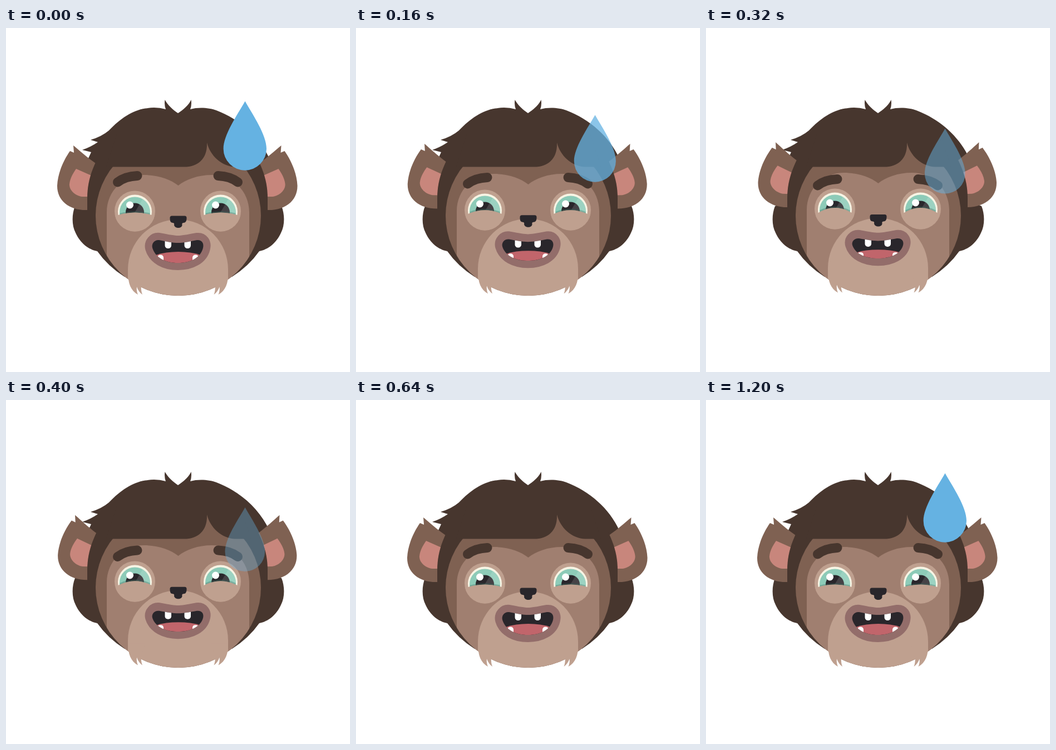
Animation of 618x618 px, one loop 1280 ms. Source, as an HTML page:

```html
<!DOCTYPE html>
<html lang="en">
<head>
<meta charset="utf-8">
<title>Nervous monkey</title>
<style>
  html, body { margin: 0; height: 100%; overflow: hidden; background: #fff; }
  svg { display: block; width: 100%; height: 100%; }
  .hair { fill: #47362e; }
  .skin { fill: #7f6152; }
  .pale { fill: #bfa08f; }
  .ink { fill: #29262b; }
</style>
</head>
<body>
<svg viewBox="0 0 618 618">
  <defs>
    <clipPath id="headClip"><ellipse cx="309.5" cy="337" rx="148.5" ry="144"/></clipPath>
    <clipPath id="socketClip"><circle cx="231.5" cy="329" r="36.5"/></clipPath>
    <clipPath id="irisClip"><circle cx="231.5" cy="331" r="27.5"/></clipPath>
    <path id="mouthShape" d="M275 381C290 384 300 386 309 386S328 384 343 381C352 380 356 387 354 395C350 412 332 422 309 422S268 412 263 395C261 387 267 380 275 381Z"/>
    <clipPath id="mouthClip"><use href="#mouthShape"/></clipPath>
  </defs>

  <!-- hair behind the face -->
  <path class="hair" d="M148 234L153 223L137 219Q152 214 165 205L152 201Q172 195 185 184C205 163 227 148 250 144.500Q270 141 287 146Q284 138 285.500 129C291 139 300 147 309 153C318 147 328 139 332.500 129Q334 138 331 146C345 142 365 143 378 148C420 164 455 195 473 234V310L495 320C501 335 501 355 494 368C486 386 471 398 455 401Q436 428 406 447H213Q183 428 164 401C148 398 133 386 125 368C118 355 118 335 124 320L146 310Z"/>

  <g id="ear">
    <path class="skin" d="M175 327H146C114 328 91.500 310 92 283C93 261 103 238 115 221L122 224L121 211C132 220 145 232 161 243L175 253Z"/>
    <path fill="#c8867c" d="M126 253L160 268L150 303H137C123 301 113 290 114 280C115 270 121 260 126 253Z"/>
  </g>
  <use href="#ear" transform="matrix(-1 0 0 1 615.500 0)"/>
  <path class="hair" d="M163 237C151 262 146 282 146 306V345H470V306C470 282 465 262 453 237Z"/>

  <g clip-path="url(#headClip)">
    <path class="skin" d="M150 180H470V490H150Z"/>
    <path id="mask" fill="#a07f70" d="M181 500V331C181 293 211 264 248 264C273 264 296 272 309.500 283C323 272 345 264 370 264C407 264 437 293 437 331V500Z"/>
  </g>
  <path class="hair" d="M180 249.500L200 188H420L440 249.500H412C388 249 367 230 361 206C362 235 345 249.500 320 249.500Z"/>

  <g id="eye">
    <circle class="pale" cx="231.5" cy="329" r="36.5"/>
    <g clip-path="url(#socketClip)">
      <circle cx="231.500" cy="330" r="30.500" fill="#f7f4e4"/>
      <circle cx="231.500" cy="331" r="27.500" fill="#8dcbb8"/>
      <circle class="ink" cx="231.500" cy="331" r="16.500"/>
      <path fill="#fff" opacity=".13" clip-path="url(#irisClip)" d="M229 335L248 303L270 318V340Z"/>
      <circle cx="222.500" cy="318" r="6.500" fill="#fff"/>
      <g clip-path="url(#irisClip)" stroke="#3b6e60" stroke-opacity=".35" stroke-width="5">
        <use href="#lid"/>
      </g>
      <path id="lid" class="pale" vector-effect="non-scaling-stroke" d="M190 340Q231.500 323 273 340V380H190Z"/>
    </g>
  </g>
  <use href="#eye" x="154"/>

  <g clip-path="url(#headClip)">
    <path id="muzzle" class="pale" d="M219 500V434A90 90 0 0 1 399 434V500Z"/>
  </g>
  <path id="tuft" class="pale" d="M219.500 440C219 458 224 472 237 479Q234 472 235 465Q238 474 245 479Q242 471 243 463L250 440Z"/>
  <use href="#tuft" transform="matrix(-1 0 0 1 618.500 0)"/>

  <path id="nose" class="ink" d="M298 337.500H321Q324.500 337.500 324.500 341V343Q324 350 319 350Q315.500 350 316.500 354C316.500 357 313 359 309.500 359S302.500 357 302 354Q303 350 299.500 350Q294.500 350 294.500 343V341Q294.500 337.500 298 337.500Z"/>

  <use id="lips" href="#mouthShape" fill="none" stroke="#936d6a" stroke-width="26"/>
  <g id="mouth">
    <use href="#mouthShape" class="ink"/>
    <g clip-path="url(#mouthClip)">
      <g id="bite" fill="#fff">
        <ellipse cx="309.500" cy="422" rx="56" ry="20" fill="#c1656b"/>
        <rect x="285.500" y="370" width="11.500" height="26" rx="5.500"/>
        <rect x="320.500" y="370" width="11.500" height="26" rx="5.500"/>
        <rect x="272" y="407.500" width="11" height="16" rx="5"/>
        <rect x="335" y="407.500" width="11" height="16" rx="5"/>
      </g>
    </g>
  </g>

  <path id="brow" fill="none" stroke="#47362e" stroke-width="17" stroke-linecap="round" d="M200.500 277Q214 266.500 236 265.500"/>
  <use href="#brow" transform="matrix(-1 0 0 1 617 0)"/>

  <path id="drop" fill="#65b2e2" d="M429.500 131.500C444 157 468 192 468 217A38.700 38.700 0 0 1 390.600 217C390.600 192 415 157 429.500 131.500Z"/>
</svg>
<script>
const LOOP = 1280, STEP = 80;
const set = (id, value, name = 'transform') =>
  document.getElementById(id).setAttribute(name, value);
const shift = (id, y) => set(id, `translate(0 ${y})`);
// Stretch vertically around the line y, then move by dy.
const stretch = (id, y, scale, dy = 0) =>
  set(id, `translate(0 ${y + dy}) scale(1 ${scale}) translate(0 ${-y})`);

function draw(now) {
  const t = Math.floor(now % LOOP / STEP) * STEP;
  const lift = Math.max(0, 1 - Math.abs(t - 320) / 320);

  shift('mask', -4 * lift);
  shift('eye', -4 * lift);
  stretch('lid', 336, 1 + lift);
  shift('muzzle', -2.5 * lift);
  shift('tuft', -3.5 * lift);
  shift('nose', -2.5 * lift);
  shift('brow', 6 * lift);
  shift('bite', 2 * lift);
  set('ear', `translate(0 ${-5 * lift}) rotate(${2 * lift} 146 327)`);
  stretch('lips', 367, 1 - 0.04 * lift, -5 * lift);
  stretch('mouth', 381, 1 - 0.12 * lift, -3 * lift);

  // The drop slides down while fading, then reappears at the top.
  const fall = t < 640 ? t / 640 : 0;
  const alpha = t < 640 ? 1 - fall : Math.min(1, Math.max(0, (t - 960) / 240));
  const size = 1 - 0.118 * fall;
  set('drop', `translate(429.5 ${131.5 + 98.5 * fall}) scale(${size}) translate(-429.5 -131.5)`);
  set('drop', alpha, 'opacity');
}

const start = performance.now();
function tick() {
  draw(performance.now() - start);
  requestAnimationFrame(tick);
}
tick();
</script>
</body>
</html>
```
